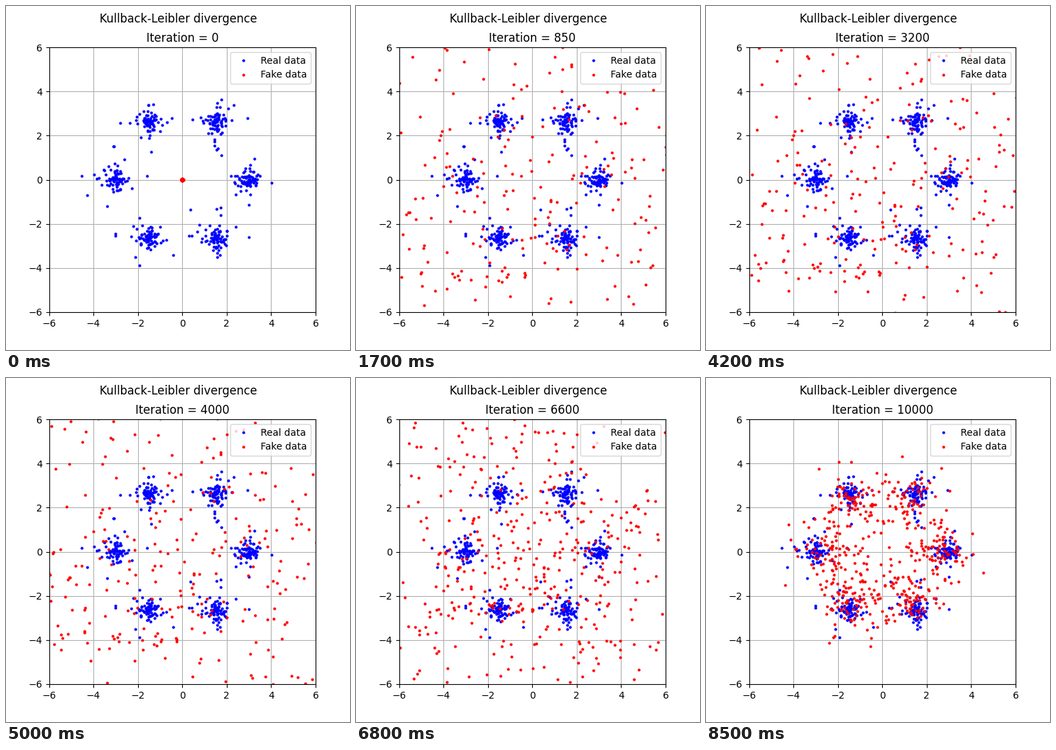
Animation, 500 px wide and 500 px high, one loop 8.6 s. Source, as a matplotlib script:

```python
import numpy as np
import matplotlib.pyplot as plt
from matplotlib.animation import FuncAnimation

FRAMES, INTERVAL = 86, 100
CLUSTERS, PER_CLUSTER, FAKES = 6, 80, 500
RING = 3.02
rng = np.random.default_rng(5)


def polar(rad, ang):
    return np.column_stack([rad * np.cos(ang), rad * np.sin(ang)])


def real_points():
    """Heavy-tailed clusters evenly placed on a ring."""
    ang = np.repeat(np.arange(CLUSTERS) * 2 * np.pi / CLUSTERS, PER_CLUSTER)
    noise = .23 * rng.standard_t(3, (len(ang), 2))
    return polar(RING, ang) + np.clip(noise, -1.5, 1.5)


def fake_layouts():
    """Unit normal cloud, and the ring that the same points settle on."""
    u = (np.arange(FAKES) + .5) / FAKES
    ang = rng.uniform(-np.pi, np.pi, FAKES)
    cloud = polar(np.sqrt(-2 * np.log(1 - u)), ang)
    pulled = ang - .8 / CLUSTERS * np.sin(CLUSTERS * ang)
    rad = 3.25 * u ** .3 + 1.6 * u ** 25
    ring = polar(rad, pulled) + rng.normal(0, .28, cloud.shape)
    return cloud, ring


def iteration(i):
    return 50 * min(i, 20) + 100 * min(max(i - 20, 0), 40) + 200 * max(i - 60, 0)


real = real_points()
cloud, ring = fake_layouts()


def fake_points(it):
    grow = .002 + .998 * min(it / 850, 1) ** 1.5
    spread = np.interp(it, [850, 2300, 5000, 8200, 10000],
                       [6.6, 6.4, 5.4, 2.5, 2.2])
    settle = max((it - 6500) / 3500, 0) ** 2
    wide = grow * spread * cloud
    sway = .15 * grow * np.sin(it / 700 + 3 * cloud[:, ::-1])
    return wide + sway * (1 - settle) + (ring - wide) * settle


fig, ax = plt.subplots(figsize=(5, 5), dpi=100)
fig.suptitle("Kullback-Leibler divergence")
ax.plot(*real.T, "b.", ms=4, label="Real data")
fake, = ax.plot([], [], "r.", ms=4, label="Fake data")
ax.set(xlim=(-6, 6), ylim=(-6, 6))
ax.grid(True)
ax.legend(loc="upper right")
title = ax.set_title("Iteration = 0")


def update(i):
    it = iteration(i)
    fake.set_data(*fake_points(it).T)
    title.set_text(f"Iteration = {it}")
    return fake, title


anim = FuncAnimation(fig, update, frames=FRAMES, interval=INTERVAL,
                     repeat=True, repeat_delay=0, blit=False)
plt.show()
```
